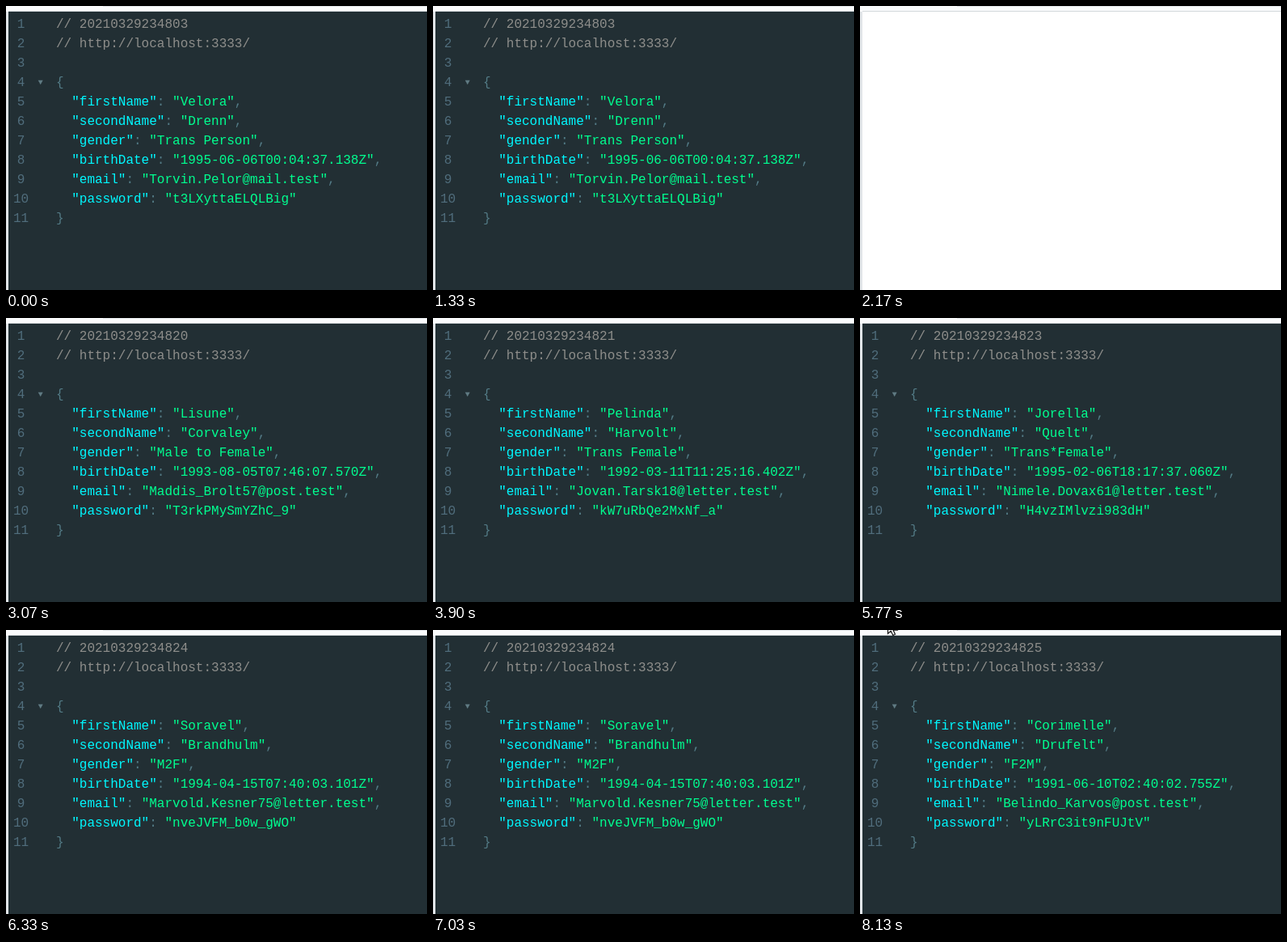
Animation, 521 px wide and 351 px high, one loop 8.16 s. Source, as an HTML page:

```html
<!DOCTYPE html>
<html lang="en">
<head>
<meta charset="utf-8">
<title>JSON response</title>
<style>
  html, body { margin: 0; width: 100%; height: 100%; overflow: hidden; background: #fafbfc; }
  svg, #page, #flash { position: absolute; left: 0; top: 0; }
  #page { top: 11px; font: 16px/24px "Liberation Mono", monospace; }
  #page div { position: relative; height: 24px; padding-left: 62px; white-space: pre; }
  .num { position: absolute; left: 0; width: 37px; text-align: center; color: #506d7c; }
  .note { color: #8e8e8b; }
  .mark { color: #537b86; }
  .key { color: #00f8ff; }
  .str { color: #00ff90; }
  #flash { left: 3px; top: 7px; width: 518px; height: 344px; background: #fff; }
</style>
</head>
<body>
<svg width="521" height="351">
  <path fill="#e1e5e8" d="M0 7h3v344H0zM120 0h401v1H120z"/>
  <path fill="#d3d8db" d="M3 6h518v1H3z"/>
  <path fill="#222f34" d="M3 7h518v344H3z"/>
  <path fill="#5f7a82" d="M39.7 91.7h6l-3 5.6z"/>
</svg>
<div id="page"></div>
<div id="flash"></div>
<svg width="521" height="351">
  <path id="cursor" fill="#fff" stroke="#111" stroke-width="1.2"
    d="M0 0V16L3.7 12.7 6.3 18 9 16.8 6.6 11.7H11.5Z"/>
</svg>
<script>
const LOOP = 8160, FIRST = 2110, EVERY = 1010, BLANK = 80;   // one reload about every second
const fields = ["firstName", "secondName", "gender", "birthDate", "email", "password"];
const records = [
  ["03", "Velora", "Drenn", "Trans Person", "1995-06-06T00:04:37.138Z", "Torvin.Pelor@mail.test", "t3LXyttaELQLBig"],
  ["20", "Lisune", "Corvaley", "Male to Female", "1993-08-05T07:46:07.570Z", "Maddis_Brolt57@post.test", "T3rkPMySmYZhC_9"],
  ["21", "Pelinda", "Harvolt", "Trans Female", "1992-03-11T11:25:16.402Z", "Jovan.Tarsk18@letter.test", "kW7uRbQe2MxNf_a"],
  ["22", "Tolvie", "Vandorelli", "Cisgender Female", "1990-05-04T14:47:39.021Z", "Rulo.Fenzer48@letter.test", "DEQ5i6IkCCgq9lV"],
  ["23", "Jorella", "Quelt", "Trans*Female", "1995-02-06T18:17:37.060Z", "Nimele.Dovax61@letter.test", "H4vzIMlvzi983dH"],
  ["24", "Soravel", "Brandhulm", "M2F", "1994-04-15T07:40:03.101Z", "Marvold.Kesner75@letter.test", "nveJVFM_b0w_gWO"],
  ["25", "Corimelle", "Drufelt", "F2M", "1991-06-10T02:40:02.755Z", "Belindo_Karvos@post.test", "yLRrC3it9nFUJtV"]
];
const page = document.getElementById("page");
const flash = document.getElementById("flash");
const cursor = document.getElementById("cursor");
const span = (kind, s) => `<span class="${kind}">${s}</span>`;

function render([second, ...values]) {
  const lines = [
    span("note", "// 202103292348" + second),
    span("note", "// http://localhost:3333/"),
    "",
    span("mark", "{"),
    ...fields.map((key, i) => "  " + span("key", `"${key}"`) + span("mark", ": ") +
      span("str", `"${values[i]}"`) + span("mark", i < 5 ? "," : "")),
    span("mark", "}")
  ];
  page.innerHTML = lines.map((line, i) => `<div>${span("num", i + 1)}${line}</div>`).join("");
}

let current = -1;
function frame() {
  const t = performance.now() % LOOP;
  const since = t - FIRST;
  const index = Math.max(0, Math.min(records.length - 1, Math.floor(since / EVERY) + 1));
  if (index !== current) render(records[current = index]);
  const loading = index > 0 && since - (index - 1) * EVERY < BLANK;
  flash.style.display = loading ? "" : "none";
  const p = Math.max(0, Math.min(1, (t - 7900) / 220));
  const rise = 24 * (1 - p) ** 2;
  cursor.setAttribute("transform", `translate(34.5 ${-11.5 - rise})`);
  cursor.style.display = p ? "" : "none";
  requestAnimationFrame(frame);
}
frame();
</script>
</body>
</html>
```
